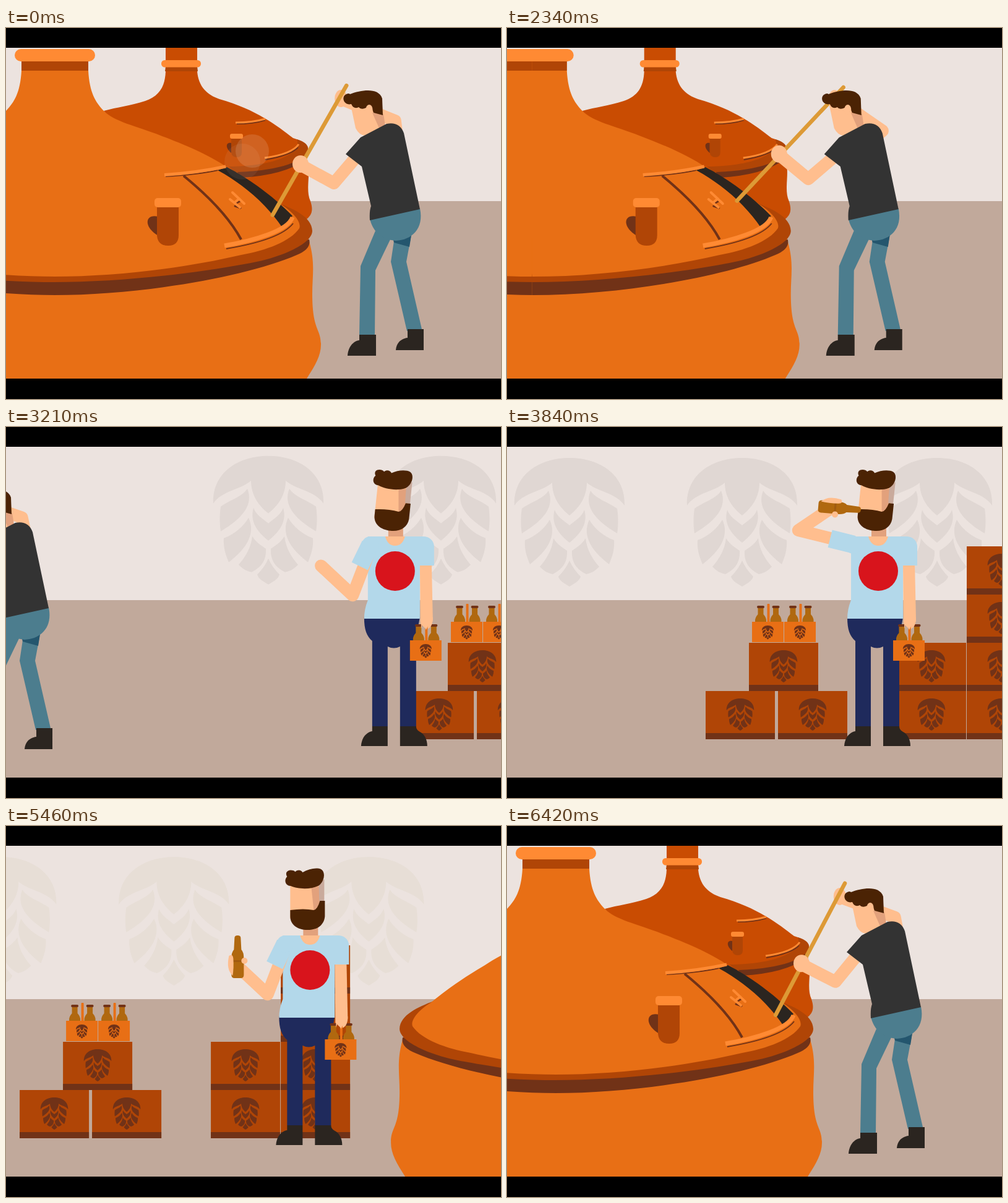
These frames come from a looping animation (800x600 px, 6.45 s). An HTML page:

```html
<!DOCTYPE html>
<html lang="en">
<head>
<meta charset="utf-8">
<title>Brewery</title>
<style>
html, body { margin: 0; width: 100%; height: 100%; overflow: hidden; background: #000; }
svg { display: block; width: 100vw; height: 100vh; }
.orange { fill: #e86f15 } .rust { fill: #b04506 } .brown { fill: #713217 } .light { fill: #ff8a33 }
.dark { fill: #2b2520 } .hair { fill: #4b2304 } .skin { fill: #ffbe8e } .shade { fill: #e2a17c }
.denim { fill: #4c7d8e } .navy { fill: #1f2a5c } .shirt { fill: #b3d8ea } .glass { fill: #b0680f }
.line { fill: none; stroke-linejoin: round }
.arm { stroke: #ffbe8e; stroke-width: 20; stroke-linecap: round }
</style>
</head>
<body>
<svg viewBox="0 0 800 600">
<defs>
  <g id="hop">
    <path d="M-89 77C-91 28-50 0 0 0S91 28 89 77C75 56 45 55 28 40C28 65 14 82 0 93C-14 82-28 65-28 40C-45 55-75 56-89 77Z"/>
    <path d="M-24 84C-20 95-10 101 0 109C10 101 20 95 24 84C31 108 15 125 0 137C-15 125-31 108-24 84Z"/>
    <path d="M-18 192C-10 184-4 175 0 166C4 175 10 184 18 192C15 200 8 203 0 208C-8 203-15 200-18 192Z"/>
    <g id="leaves">
      <path d="M-77 82C-60 70-42 66-34 53C-24 78-40 100-77 122C-79 110-79 95-77 82Z"/>
      <path d="M-72 133C-55 127-40 114-32 100C-20 125-35 150-64 172C-70 158-73 146-72 133Z"/>
      <path d="M-26 130C-20 140-10 146-4 150C-3 170-12 180-27 188C-38 186-44 180-48 176C-36 162-28 148-26 130Z"/>
    </g>
    <use href="#leaves" transform="scale(-1 1)"/>
  </g>
  <g id="box">
    <path class="rust" d="M0 0H112V78H0Z"/><path class="brown" d="M0 68H112V78H0Z"/>
    <use href="#hop" class="brown" transform="translate(56 12) scale(.25)"/>
  </g>
  <g id="beer">
    <path class="glass" d="M-4.500-24H4.500V-12Q9-7 9-2V2H-9V-2Q-9-7-4.500-12Z"/>
    <rect class="brown" x="-6" y="-26" width="12" height="4" rx="2"/>
  </g>
  <g id="pack">
    <use href="#beer" x="14"/><use href="#beer" x="38.500"/>
    <rect class="orange" x="24.500" y="-29" width="4" height="32" rx="1"/>
    <path class="orange" d="M0 0H51V33H0Z"/>
    <use href="#hop" class="brown" transform="translate(25.500 6) scale(.108)"/>
  </g>
  <g id="half">
    <path class="orange" d="M77 340H488L490 345C500 380 495 400 495 430C495 490 509 485 509 512C509 530 500 545 486 567H77Z"/>
    <path class="brown" d="M77 400L490 342Q494 357 470 367C390 402 220 432 77 432Z"/>
    <path class="rust" d="M77 398L440 283C465 293 494 305 495 328C495 350 440 373 390 381C300 398 180 411 77 411Z"/>
    <path class="orange" d="M77 54H133V69C135 105 145 120 157 133C175 152 210 158 250 174C300 193 330 207 357 225C400 250 425 270 445 286C465 298 478 315 474 324C460 345 420 360 380 367C290 388 180 402 77 402Z"/>
    <path class="rust" d="M77 54H133V69H77Z"/>
  </g>
</defs>

<path fill="#ece3df" d="M0 32H800V280H0Z"/>
<path fill="#c1a99b" d="M0 280H800V567H0Z"/>
<g id="hops">
  <use href="#hop" x="101" y="50"/><use href="#hop" x="380" y="50"/><use href="#hop" x="695" y="50"/>
</g>

<g id="boxes">
  <use href="#box" x="321" y="427"/><use href="#box" x="438" y="427"/><use href="#box" x="391" y="349"/>
  <use href="#pack" x="396" y="315"/><use href="#pack" x="448" y="315"/>
  <use href="#box" x="630" y="349"/><use href="#box" x="630" y="427"/>
  <use href="#box" x="743" y="193"/><use href="#box" x="743" y="271"/><use href="#box" x="743" y="349"/><use href="#box" x="743" y="427"/>
</g>

<g id="drinker">
  <path class="skin" d="M640 220H659L661 312Q658 327 650 327L641 318Z"/>
  <path class="navy" d="M550 308H640L634 340V484H608V355Q598 360 588 355V484H563V346C554 338 550 328 550 308Z"/>
  <path class="dark" d="M563 484H588V516H545C546 500 556 493 563 492ZM608 484H634Q634 490 640 493C648 497 652 506 652 516H608Z"/>
  <path class="shirt" d="M556 177H645C655 177 662 183 663 192V224H640V310H550Q550 295 556 280Z"/>
  <path class="skin" d="M584 177H616Q612 192 600 192T584 177Z"/>
  <path class="shade" d="M589 160H613V177H589Z"/>
  <circle cx="600" cy="233" r="32" fill="#d8141c"/>
  <use href="#pack" x="624" y="345"/>
  <path class="skin" d="M642 308H661Q661 322 655 325V318L650 328L645 318L642 326Z"/>
  <g id="head">
    <path class="skin" d="M568 90H620V150H568Z"/>
    <path class="shade" d="M602 98H616V136H606Z"/>
    <path fill="#c9aa9c" d="M614 92L623 86V121H615Z"/>
    <path class="hair" d="M568 136Q590 133 606 136Q612 135 616 121H624V146C623 160 612 168 596 168S568 160 568 146Z"/>
    <path class="hair" d="M569 97C559 97 558 86 563 82C557 72 571 69 576 74C580 70 586 71 588 75C598 69 611 67 618 70C626 75 623 91 613 97C600 103 580 102 569 97Z"/>
  </g>
  <path id="lift" class="line arm"/>
  <path id="sleeve" class="line" stroke="#b3d8ea" stroke-width="29"/>
  <circle class="shirt" cx="560" cy="191" r="14"/>
  <g id="grip">
    <path class="glass" d="M-34-5Q-34-10-29-10H-2Q8-10 12-6L31-5Q35-5 35 0T31 5L12 6Q8 10-2 10H-29Q-34 10-34 5Z"/>
    <path class="brown" d="M-8-10H-5V10H-8Z" opacity=".25"/>
    <path class="skin" d="M-30-8Q-20-19 2-14Q6-8-2-7Q-18-6-30-8Z"/>
    <circle class="skin" cx="-6" cy="11" r="5"/>
  </g>
</g>

<g id="brewery">
  <path fill="#c94c02" d="M258 32H309V70C311 95 325 108 345 115C405 132 438 158 464 178C486 184 490 196 486 212L488 220C492 240 484 262 492 280C498 298 492 304 485 310H300L158 134C180 128 200 126 225 118C248 110 257 95 258 70Z"/>
  <path class="brown" d="M370 228Q440 224 482 206V214Q450 238 380 242Z"/>
  <path class="rust" d="M360 224C430 224 480 204 470 180Q490 186 488 197C480 222 420 232 370 233Z"/>
  <path class="rust" d="M258 62H309L310 70H257Z"/>
  <rect class="light" x="251" y="52" width="64" height="11.500" rx="5.500"/>
  <path class="brown" d="M364 186C355 184 354 194 364 202Z"/>
  <path class="rust" d="M364 176H381V201Q381 209 373 209T364 201Z"/>
  <rect class="light" x="362" y="171" width="21" height="8" rx="3"/>
  <path class="line" stroke="#713217" stroke-width="2" d="M373 155Q400 155 419 149M419 213Q460 206 472 193"/>
  <path class="line" stroke="#ff8a33" stroke-width="3" d="M371 153Q398 153 419 147M418 210Q462 204 473 188"/>

  <use href="#half" transform="matrix(-1 0 0 1 158 0)"/><use href="#half"/>
  <rect class="light" x="14" y="34" width="130" height="20" rx="10"/>
  <path class="brown" d="M246 305C224 300 222 322 246 336Z"/>
  <path class="rust" d="M244 286H279V335Q279 352 262 352T244 335Z"/>
  <rect class="light" x="240" y="275" width="43" height="15" rx="5"/>
  <path class="dark" d="M342 230L357 225C400 247 440 280 463 304L446 322C425 291 390 256 342 230Z"/>
  <path class="line" stroke="#713217" stroke-width="4" d="M287 239C325 270 360 305 380 342"/>
  <path class="line" stroke="#713217" stroke-width="2" d="M258 240Q310 237 342 230M356 357C410 348 450 334 464 316"/>
  <path class="line" stroke="#ff8a33" stroke-width="5" d="M256 237.500Q310 234 355 224"/>
  <path class="line" stroke="#ff8a33" stroke-width="7" d="M353 352C400 344 456 328 463 306"/>
  <path class="line" stroke="#713217" stroke-width="3" stroke-linecap="round" d="M373 283L380 279M370 288L379 291"/>
  <path class="line" stroke="#ff8a33" stroke-width="4" stroke-linecap="round" d="M366 266L385 284M362 277L378 290M371 281L377 276"/>
  <g id="steam" fill="#fff"></g>

  <path id="backArm" class="line arm"/>
  <ellipse id="backHand" class="skin" rx="10" ry="14"/>
  <path id="stick" class="line" stroke="#dd9a36" stroke-width="6.500" stroke-linecap="round"/>
  <path class="denim" d="M628 338L655 335L647 378L672 487L648 490L622 378Z"/>
  <path fill="#24566e" d="M626 343L655 335L652 354L627 347Z"/>
  <path class="denim" d="M597 328L573 385L571 497H596L597 392L622 340Z"/>
  <path class="denim" d="M588 308L669 292C676 325 655 343 630 344C606 342 592 328 588 308Z"/>
  <path class="dark" d="M598 496V530H552C553 515 562 506 571 505V496ZM675 487V521H630C631 508 640 502 649 501V487Z"/>
  <path class="skin" d="M557 124L565 162Q571 174 581 174L612 158L608 126L575 116Z"/>
  <path class="shade" d="M592 137L610 139L613 158L603 162Z"/>
  <path class="hair" d="M556 107C575 100 602 96 608 114L609 141L594 137L590 126L582 129Q574 133 570 128Q562 132 558 123C546 126 541 111 550 107Q554 105 556 107Z"/>
  <ellipse class="skin" cx="587" cy="132" rx="5.500" ry="8"/>
  <path id="frontArm" class="line arm"/>
  <ellipse id="frontHand" class="skin" rx="13" ry="14"/>
  <path fill="#333" d="M573 177L549 204L575 224L590 288Q587 296 588 311L669 293L643 170C639 157 628 152 615 155Z"/>
</g>
<path d="M0 0H800V32H0ZM0 567H800V600H0Z"/>
</svg>

<script>
const LOOP = 6450, TURN = 4500;
const $ = id => document.getElementById(id);
const set = (id, attrs) => { for (const k in attrs) $(id).setAttribute(k, attrs[k]); };
const slide = (id, x, y = 0) => set(id, { transform: `translate(${x} ${y})` });
const clamp = x => Math.min(1, Math.max(0, x));
const ease = (t, a, b) => { const u = clamp((t - a) / (b - a)); return u * u * (3 - 2 * u); };
const mix = (a, b, u) => a + (b - a) * u;

// Smooth path through [time, value, speed] keys, held at both ends.
function glide(t, keys) {
  if (t <= keys[0][0]) return keys[0][1];
  for (let i = 1; i < keys.length; i++) {
    const [t0, x0, v0] = keys[i - 1], [t1, x1, v1] = keys[i];
    if (t > t1) continue;
    const d = t1 - t0, u = (t - t0) / d, w = 1 - u;
    return w * w * ((1 + 2 * u) * x0 + u * d * v0) + u * u * ((3 - 2 * u) * x1 - w * d * v1);
  }
  return keys[keys.length - 1][1];
}

const panIn = [[2070, 0, 0], [2340, 36, .28], [2820, 279, .8], [3330, 690, .72], [3840, 923, 0]];
const panOut = [[5050, 0, 0], [5460, 297.5, 1.4], [6420, 1272, 0]];
const enter = [[2450, 370, -.9], [2820, 136, -.4], [3600, 0, 0]];
const leave = [[5050, 0, 0], [5460, 108, .65], [6150, 950, 1.5]];

// Each puff: centre at its peak, radius, start, end and strength.
const puffs = [
  [349, 157, 27, 500, 1900, .48], [362, 163, 27, 350, 1950, .5], [394, 193, 27, -150, 2150, .6],
  [350, 193, 28, 250, 1900, .32], [378, 210, 29, -100, 1850, .34]
];
$('steam').innerHTML = puffs.map(p => `<circle r="${p[2]}"/>`).join('');

function steam(t) {
  puffs.forEach(([x, y, , from, to, strength], i) => {
    const c = $('steam').children[i], u = clamp((t - from) / (to - from)), late = (t - 1290) / 1290;
    c.setAttribute('cx', x - 4 * late);
    c.setAttribute('cy', y - 6 * late);
    c.setAttribute('opacity', strength * Math.sin(Math.PI * u));
  });
}

function stir(t) {
  const s = Math.cos(.84 + .0115 * (t < TURN ? t : t - LOOP));
  const bx = 421 + 15 * s, by = 292.5 + 15 * s, tx = 563 - 19.4 * s, ty = 94.3 - 1.9 * s;
  const hx = mix(tx, bx, .1) + 3, hy = mix(ty, by, .1), gy = 213 + 10.6 * s;
  set('stick', { d: `M${bx} ${by}L${tx} ${ty}` });
  set('backArm', { d: `M632 176L${635 - 9.4 * s} ${157 - 10.6 * s}L${hx + 8} ${hy + 4}` });
  set('backHand', { cx: hx, cy: hy });
  set('frontArm', { d: `M570 204L${527 + 4.4 * s} ${248 + 4.4 * s}L477 ${gy + 2}` });
  set('frontHand', { cx: 476, cy: gy });
}

function drink(t) {
  const up = ease(t, 3330, 3820) - ease(t, 4545, 4830);
  const polar = (x, y, len, deg) => [x + len * Math.cos(deg * Math.PI / 180), y + len * Math.sin(deg * Math.PI / 180)];
  const sx = 563, sy = 190, upper = mix(111, 194, up);
  const [ex, ey] = polar(sx, sy, mix(88, 95, up), upper);
  const [hx, hy] = polar(ex, ey, mix(70, 64, up), mix(223, 326, up));
  const [cx, cy] = polar(sx - 3, sy, 39, upper + 5 * (1 - up));
  set('lift', { d: `M${sx} ${sy}L${ex} ${ey}L${hx} ${hy}` });
  set('sleeve', { d: `M${sx - 3} ${sy}L${cx} ${cy}` });
  const gx = mix(483, 537, up), gy = mix(212, 131, up);
  set('grip', {
    transform: `translate(${gx} ${gy}) rotate(${mix(-90, 5, up)})`,
    display: t > 3330 ? 'inline' : 'none'
  });
  set('head', { transform: `rotate(${6 * (1 - ease(t, 4545, 4830))} 596 133)` });
}

function draw(now) {
  const t = now % LOOP, first = t < TURN;
  const pan = glide(t, first ? panIn : panOut);
  const man = first ? glide(t, enter) : -glide(t, leave);
  const warm = ease(t, 5050, 5460);
  slide('brewery', first ? -pan : 1272 - pan);
  slide('boxes', first ? 923 - pan : -pan);
  slide('hops', first ? 923 - pan : man, -5 * (1 - ease(t, 2820, 3840)));
  set('hops', { fill: `rgb(${mix(224, 231, warm)} ${mix(215, 222, warm)} ${mix(211, 214, warm)})` });
  slide('drinker', man);
  set('drinker', { display: t > 2450 && t < 6150 ? 'inline' : 'none' });
  set('hops', { display: t < 6150 ? 'inline' : 'none' });
  steam(t);
  stir(t);
  drink(t);
}

const start = performance.now();
(function frame() {
  draw(performance.now() - start);
  requestAnimationFrame(frame);
})();
</script>
</body>
</html>
```
